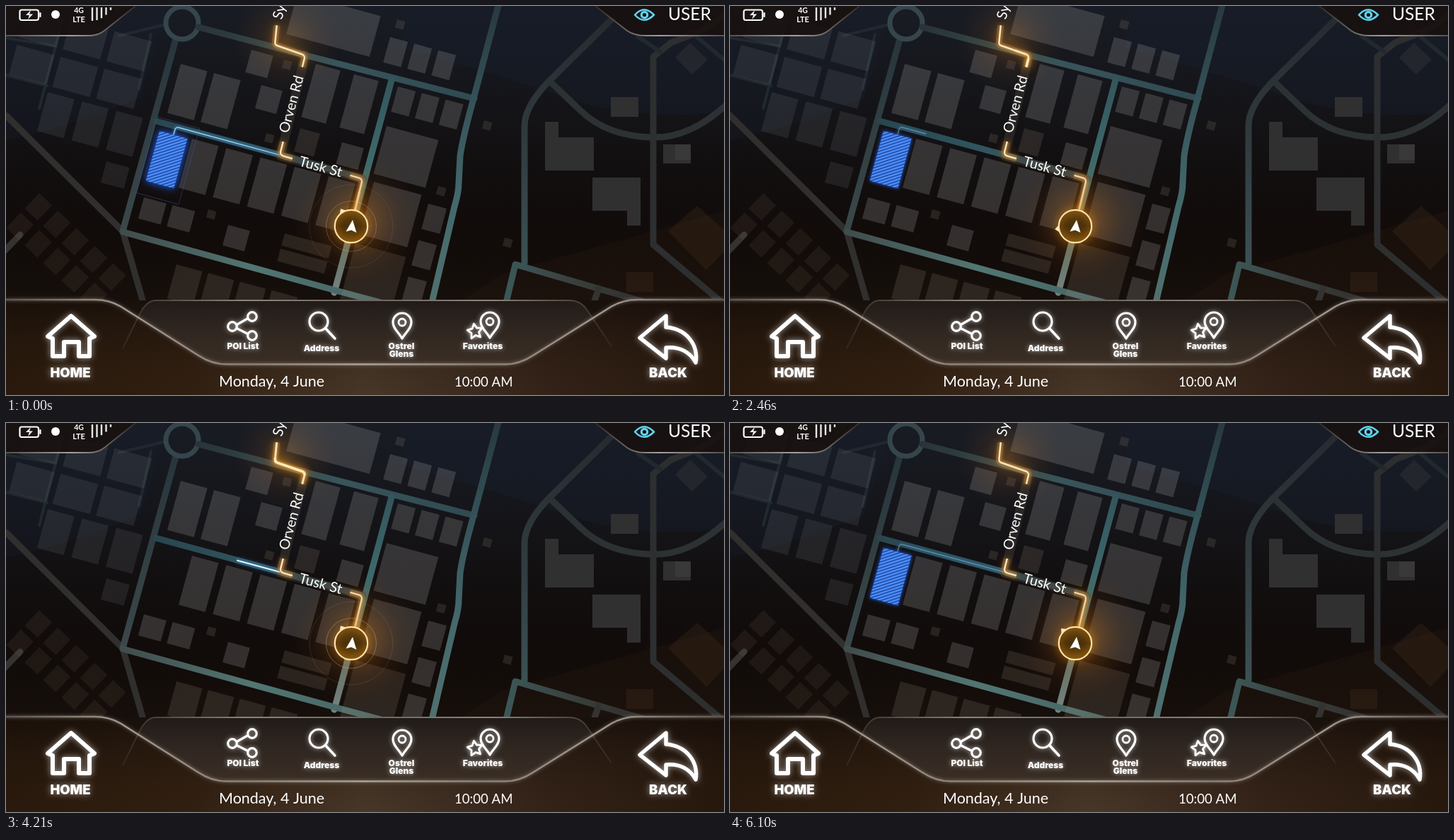
Recreate the animation shown at these times as an HTML page with a canvas. Size 1015 by 551 pixels, loop 6160 ms.

```html
<!DOCTYPE html>
<html lang="en">
<head>
<meta charset="utf-8">
<title>Navigation</title>
<style>
html, body { margin: 0; width: 100%; height: 100%; overflow: hidden; background: #110d0c; }
canvas { display: block; width: 100vw; height: 100vh; }
</style>
</head>
<body>
<canvas id="stage" width="1015" height="551"></canvas>
<script>
const W = 1015, H = 551, LOOP = 6160, CYCLE = 4800, TILT = 15.3 * Math.PI / 180;
const stage = document.getElementById('stage').getContext('2d');
let c = stage;

function layer(paint) {
  const cv = document.createElement('canvas');
  cv.width = W;
  cv.height = H;
  c = cv.getContext('2d');
  paint();
  c = stage;
  return cv;
}

function ramp(g, colors) {
  colors.forEach((col, i) => g.addColorStop(i / (colors.length - 1), col));
  return g;
}

const gradient = (x0, y0, x1, y1, ...colors) => ramp(c.createLinearGradient(x0, y0, x1, y1), colors);

function glowSpot(x, y, r, ...colors) {
  c.fillStyle = ramp(c.createRadialGradient(x, y, 0, x, y, r), colors);
  c.fillRect(x - r, y - r, 2 * r, 2 * r);
}

function line(d, color, width) {
  c.strokeStyle = color;
  c.lineWidth = width;
  c.stroke(new Path2D(d));
}

function fill(d, color) {
  c.fillStyle = color;
  c.fill(new Path2D(d));
}

function disc(x, y, r, color) {
  c.beginPath();
  c.arc(x, y, r, 0, 7);
  c.fillStyle = color;
  c.fill();
}

function ring(x, y, r, color, width) {
  c.beginPath();
  c.arc(x, y, r, 0, 7);
  c.strokeStyle = color;
  c.lineWidth = width;
  c.stroke();
}

function text(str, x, y, font, align = 'left', angle = 0) {
  c.save();
  c.translate(x, y);
  c.rotate(angle);
  c.font = font;
  c.textAlign = align;
  c.fillStyle = '#fff';
  c.fillText(str, 0, 0);
  c.restore();
}

// A turned grid of equal blocks, nx by ny, that starts at a corner.
function blocks(x, y, w, h, nx = 1, stepX = 0, ny = 1, stepY = 0, angle = TILT) {
  c.save();
  c.translate(x, y);
  c.rotate(angle);
  for (let i = 0; i < nx; i++)
    for (let j = 0; j < ny; j++) c.fillRect(i * stepX, j * stepY, w, h);
  c.restore();
}

function paintGround() {
  c.fillStyle = gradient(0, 0, 0, H, '#181c24', '#15161b', '#120f10', '#110b09', '#17100c', '#21160e');
  c.fillRect(0, 0, W, H);
  fill('M560 0 H1015 V150 Q900 165 790 130 Q690 95 560 60 Z', 'rgba(24,30,42,.45)');
  fill('M0 0 H230 L190 130 Q80 175 0 190 Z', 'rgba(24,32,46,.3)');
  fill('M700 380 L1015 290 V420 H640 Z', 'rgba(50,30,16,.2)');
}

function paintRoads() {
  c.lineCap = 'round';
  c.lineJoin = 'round';
  const dim = '#20292e', gray = '#2d2e2f';
  line('M0 45 L70 57 M75 38 L47 145 M0 98 L58 113 M205 40 L188 118 M160 42 L226 26', dim, 4);
  line('M0 155 L165 319 L194 420', '#302f2d', 9);
  line('M240 47 L165 319', gradient(0, 47, 0, 319, '#28363c', '#3b484a'), 9);
  ring(249, 24, 23, '#35454b', 7);
  line('M272 30 L424 70 L662 131', gradient(272, 30, 662, 131, '#293438', '#38555a', '#304a51'), 9);
  line('M697 -5 L661 131 Q646 185 642 212 L640 250 Q640 264 634 284 L602 420',
    gradient(0, 0, 0, 417, '#293940', '#355359', '#44696c', '#50706e'), 9);
  line('M545 105 L464 406', gradient(0, 105, 0, 406, '#33565d', '#41706f', '#77807a'), 9);
  line('M212 163 L388 211 L502 244', gradient(212, 0, 502, 0, '#29464e', '#31555f', '#414b4b'), 9);
  line('M165 320 L470 404 L530 420', gradient(165, 0, 530, 0, '#414c4c', '#527672', '#466463'), 9);
  line('M857 18 L768 106 Q733 142 733 170 V364', gradient(0, 18, 0, 364, '#262b30', '#303b3e', '#3b5153'), 9);
  line('M768 106 L812 148 Q850 185 915 186 Q967 187 1018 140', '#2c3234', 9);
  line('M1018 12 Q986 35 975 38 L940 52 L915 72 V338 L1018 425', gray, 9);
  line('M893 43 L925 65 M972 40 L1015 76', dim, 6);
  line('M707 420 L720 366 L905 420', gradient(707, 0, 905, 0, '#3c5757', '#393f3d', '#302e2b'), 9);
  line('M838 400 L831 420 M-5 350 L20 324', '#353331', 9);
  line('M388 212 L423 70 M388 212 L504 245', 'rgba(70,64,58,.42)', 13);
}

function paintBlocks() {
  c.fillStyle = 'rgba(150,154,160,.13)';
  blocks(30, 2, 55, 44, 3, 64, 2, 55);
  blocks(59, 122, 39, 57, 3, 50.3);
  blocks(142, 220, 34, 31);

  c.fillStyle = 'rgba(168,168,170,.23)';
  blocks(247, 82, 39, 72, 2, 48.8);
  blocks(347, 62, 32, 33);
  blocks(361, 112, 31, 34);
  blocks(195, 271, 33, 31, 2, 42);
  blocks(314, 310, 32, 30);
  blocks(438, 82, 36, 78, 2, 56);
  blocks(475, 193, 32, 32);
  blocks(412, -18, 122, 60);
  blocks(543, 44, 26, 37, 3, 35.3);
  blocks(554, 114, 26, 37, 3, 35);
  blocks(538, 170, 76, 70);
  blocks(520, 249, 70, 77);
  blocks(263, 188, 39, 72, 5, 50.1);
  blocks(597, 280, 27, 37, 1, 0, 3, 53.5);

  c.fillStyle = 'rgba(165,148,130,.17)';
  blocks(416, 173, 29, 34);
  blocks(394, 322, 69, 18, 1, 0, 2, 22.6);
  blocks(494, 336, 74, 84);
  blocks(241, 366, 38, 50, 4, 46.5);
  for (const [x, y] of [[553, 19], [393, 76], [676, 162], [368, 180], [611, 255], [286, 288], [705, 328]])
    blocks(x, y, 12, 12);

  c.fillStyle = 'rgba(120,98,80,.14)';
  blocks(47, 265, 25, 30, 5, 36, 2, 38, 0.76);

  fill('M855 129 h39 v28 h-39 Z M762 164 h19 v22 h50 v47 h-69 Z M829 243 h68 v68 h-19 v-21 h-49 Z M929 196 h39 v27 h-39 Z', '#303031');
  fill('M946 196 h22 v22 h-22 Z', '#393939');
  fill('M967 52 L992 76 L970 97 L946 73 Z', '#23262c');
  fill('M977 283 L1018 320 V345 L990 374 L936 319 Z M877 377 h38 v28 h-38 Z', 'rgba(90,60,38,.2)');
}

const railPath = 'M0 416 H125 Q146 416 162 425.500 L272 495 Q291 507.500 312 507.500 H706 Q726 507.500 745 495 L856 425.500 Q873 416 893 416 H1015';
const topLeft = 'M0 42 H118 Q130 42 139 35 L183 0';
const topRight = 'M1015 42 H904 Q888 42 878 35 L833 0';

function paintPanels() {
  fill(topLeft + ' H0 Z', 'rgba(24,18,15,.88)');
  fill(topRight + ' H1015 Z', 'rgba(24,18,15,.88)');
  line(topLeft, gradient(0, 0, 185, 0, '#55504c', '#a5a09a', '#2e2b2a'), 2);
  line(topRight, gradient(1015, 0, 833, 0, '#55504c', '#a5a09a', '#2e2b2a'), 2);

  c.fillStyle = gradient(0, 416, 0, H, '#17100b', '#2a1b0f');
  c.fillRect(0, 417, W, H - 417);
  fill(railPath + ' V551 H0 Z', gradient(0, 0, W, 0, '#28190d', '#301f11', '#4a3a2c', '#33231a', '#25170d'));
  fill(railPath + ' V551 H0 Z', gradient(0, 416, 0, H, 'rgba(14,9,7,.6)', 'rgba(50,30,12,.1)'));
  fill('M211 417 H796 Q813 417 821 430 L831 441 L745 495 Q726 507 706 507 H312 Q291 507 272 495 L187 441 Q197 417 211 417 Z',
    gradient(0, 417, 0, 507, '#211b18', '#302721', '#3a2e24'));
  line('M165 485 L188 438 Q198 417 212 417 H796 Q812 417 821 430 L856 482',
    gradient(165, 0, 856, 0, '#33281f', '#8d857d', '#6b645e', '#8d857d', '#33281f'), 1.8);
  c.shadowColor = 'rgba(255,235,215,.4)';
  c.shadowBlur = 5;
  line(railPath, gradient(0, 0, W, 0, '#5c554f', '#a39b93', '#877f78', '#aaa29b', '#877f78', '#a39b93', '#5c554f'), 2.4);
  c.shadowBlur = 0;
}

function pin(x, y) {
  line(`M${x} ${y + 23} C${x - 5} ${y + 14} ${x - 13} ${y + 9} ${x - 13} ${y} A13 13 0 0 1 ${x + 13} ${y} C${x + 13} ${y + 9} ${x + 5} ${y + 14} ${x} ${y + 23} Z`, '#fff', 3.2);
  ring(x, y, 5, '#fff', 2.8);
}

function star(x, y, r) {
  c.beginPath();
  for (let i = 0; i < 10; i++) {
    const a = i * Math.PI / 5 - Math.PI / 2 - 0.15, d = i % 2 ? r * 0.5 : r;
    c.lineTo(x + d * Math.cos(a), y + d * Math.sin(a));
  }
  c.closePath();
  c.fillStyle = '#2c241f';
  c.fill();
  c.stroke();
}

function paintButtons() {
  c.lineCap = c.lineJoin = 'round';
  c.shadowColor = 'rgba(255,255,255,.6)';
  c.shadowBlur = 9;
  line('M59 468 L92 439 L125 468 L118 471 V496 H103 V476 H82 V496 H66 V471 Z', '#fff', 6);
  line('M933 439 L896 470 L933 499 V484 C952 482 967 490 975 505 C979 480 962 457 933 455 Z', '#fff', 5.5);
  const big = '900 18.5px Inter, sans-serif', small = '900 12px Inter, sans-serif';
  text('HOME', 91, 526, big, 'center');
  text('BACK', 936, 526, big, 'center');

  c.shadowBlur = 6;
  line('M341 443 L327 451 M327 457 L341 464', '#fff', 3.2);
  for (const [x, y] of [[348, 440], [320, 454], [348, 467]]) ring(x, y, 6.3, '#fff', 3.2);
  ring(442, 447, 13, '#fff', 3.2);
  line('M452 457 L465 471', '#fff', 3.6);
  pin(560, 448);
  pin(684, 447);
  star(663, 461, 11);
  text('POI List', 335, 486, small, 'center');
  text('Address', 446, 489, small, 'center');
  text('Ostrel', 559, 486, small, 'center');
  text('Glens', 559, 497, small, 'center');
  text('Favorites', 674, 486, small, 'center');
  c.shadowBlur = 0;
}

function paintStatus() {
  text('Monday, 4 June', 301, 539, '21.5px Lato, sans-serif');
  text('10:00 AM', 634, 539, '18.6px Lato, sans-serif');
  text('USER', 936, 20, '24.5px Lato, sans-serif');
  line('M22 5.500 H43 Q46 5.500 46 8.500 V17 Q46 20 43 20 H22 Q19.500 20 19.500 17 V8.500 Q19.500 5.500 22 5.500 Z M48.500 10 V15', '#fff', 2.2);
  fill('M35 6 L28 13 H33 L31 19 L38 11.500 H33 Z', '#fff');
  disc(70, 12, 6, '#fff');
  text('4G', 103, 10, 'bold 10.5px Lato, sans-serif', 'center');
  text('LTE', 103, 23, 'bold 11px Lato, sans-serif', 'center');
  c.lineCap = 'butt';
  for (let i = 0; i < 5; i++) line(`M${122 + i * 6.5} 2 V${21 - i * i * 0.95}`, '#e8e8e8', 2.4);
  line('M889 12.500 Q902 -2 916 12.500 Q902 27 889 12.500 Z', '#5fd3ee', 2.6);
  ring(902.5, 12.5, 4.2, '#5fd3ee', 3.2);
}

const ground = layer(() => { paintGround(); paintRoads(); paintBlocks(); });
const overlay = layer(() => { paintPanels(); paintButtons(); paintStatus(); });

const span = (t, a, b) => Math.max(0, Math.min(1, (t - a) / (b - a)));
const smooth = v => v * v * (3 - 2 * v);
const easeOut = v => 1 - (1 - v) ** 3;
const mix = (a, b, v) => a + (b - a) * v;
// Time since a late event, carried over the start of the cycle.
const since = (p, event) => p > 3400 ? p - event : p + CYCLE - event;

function rounded(points, r) {
  const p = new Path2D();
  p.moveTo(...points[0]);
  for (let i = 1; i < points.length - 1; i++) p.arcTo(...points[i], ...points[i + 1], r);
  p.lineTo(...points[points.length - 1]);
  return p;
}

function strokePart(path, from, to, color, width, glow, blur) {
  if (to <= from) return;
  c.save();
  c.setLineDash([0, from, to - from, 2000]);
  c.strokeStyle = color;
  c.lineWidth = width;
  c.shadowColor = glow;
  c.shadowBlur = blur;
  c.stroke(path);
  c.restore();
}

const HUB = [488, 312];
const route = rounded([HUB, [504, 245], [387, 211], [423, 70], [380, 55], [386, -5]], 5);
const routeParts = [[24, 85], [170, 206], [315, 402]];
const branch = rounded([[387, 211], [240, 171], [237, 182]], 4);
const BRANCH = 162;

function drawRoute(p) {
  const head = (p % 1600) * 0.35;
  glowSpot(396, 48, 75, 'rgba(235,150,50,.26)', 'rgba(190,110,35,.1)', 'rgba(150,80,20,0)');
  for (const [a, b] of routeParts) {
    strokePart(route, a, b, 'rgba(205,150,80,.28)', 9, 'rgba(255,150,30,.55)', 16);
    strokePart(route, a, b, '#fbe4bb', 2.5, '#f09a28', 7);
    for (let reach = 50; reach > 20; reach -= 24) {
      const from = Math.max(a, head - reach), to = Math.min(b, head + reach);
      strokePart(route, from, to, `rgba(255,238,195,${20 / reach})`, 3.6, '#ffa51f', 13);
    }
  }
}

function drawBranch(p) {
  const growing = p > 3000, age = span(p, 0, 1000);
  const cut = growing ? 0 : BRANCH * smooth(span(p, 1900, 2780));
  const end = growing ? BRANCH * span(p, 4040, 4480) : BRANCH;
  const settle = span(p, 4250, 4720);
  const width = growing ? mix(2.2, 1.2, settle) : mix(1.2, 0.8, age);
  c.globalAlpha = growing ? 1 : mix(1, 0.65, age);
  strokePart(branch, cut, end, 'rgba(60,130,190,.12)', 7, '#2f7fc8', 5);
  strokePart(branch, cut, end, settle < 0.5 && growing ? '#e6f4ff' : '#b4dcee', width, '#3f8fd8', growing ? mix(9, 4, settle) : 3);
  c.globalAlpha = 1;
}

function hatch(base, stripe, alpha, blur) {
  if (alpha <= 0) return;
  c.save();
  c.globalAlpha = alpha;
  c.translate(217, 177);
  c.rotate(TILT);
  c.shadowColor = '#1f62ff';
  c.shadowBlur = blur;
  c.fillStyle = base;
  c.fillRect(0, 0, 41, 73);
  c.shadowBlur = 0;
  c.beginPath();
  c.rect(0, 0, 41, 73);
  c.clip();
  c.beginPath();
  for (let y = 0; y < 108; y += 4.8) {
    c.moveTo(-1, y);
    c.lineTo(43, y - 29);
  }
  c.strokeStyle = stripe;
  c.lineWidth = 2.5;
  c.stroke();
  c.restore();
}

function drawTarget(p) {
  const shown = p > 3500 ? span(p, 4350, 4600) : 1 - span(p, 2620, 2980);
  const ghost = span(p, 2600, 2800) * (1 - span(p, 3060, 3400));
  hatch('rgba(30,28,27,.6)', '#4a4847', ghost, 0);
  hatch('#1f49a2', '#4c8df8', shown, p > 3500 ? 12 : mix(12, 5, span(p, 0, 900)));

  const age = since(p, 4450);
  if (age < 0 || age > 1000) return;
  const s = 1 + 0.58 * easeOut(span(age, 0, 700));
  c.save();
  c.translate(229, 219);
  c.rotate(TILT);
  c.strokeStyle = `rgba(72,100,165,${0.4 * (1 - span(age, 250, 1000))})`;
  c.lineWidth = 1;
  c.strokeRect(-20.5 * s, -37 * s, 41 * s, 74 * s);
  c.restore();
}

function drawHub(p) {
  const [x, y] = HUB;
  glowSpot(x + 8, y - 8, 92, 'rgba(255,150,20,.45)', 'rgba(205,115,22,.26)', 'rgba(150,85,25,.1)', 'rgba(120,60,10,0)');
  const age = since(p, 3550);
  if (age > 0 && age < 1850) {
    const fade = 1 - span(age, 1100, 1850), grow = easeOut(span(age, 0, 800));
    ring(x, y, 23 + 12.5 * grow, `rgba(225,200,165,${0.36 * fade})`, 1);
    ring(x, y, 23 + 36 * grow, `rgba(205,175,140,${0.15 * fade})`, 1);
  }
  const turn = -31 - 68 * Math.sin(Math.PI * p / CYCLE) ** 6;
  c.save();
  c.translate(x, y);
  c.rotate(turn * Math.PI / 180);
  fill('M-6 -22 L0 -29 L6 -22 Z', '#fff3dc');
  c.restore();
  disc(x, y, 23, gradient(x, y - 23, x, y + 23, '#65430f', '#4a2f0a', '#744a0d'));
  c.save();
  c.shadowColor = '#ff9d14';
  c.shadowBlur = 11;
  ring(x, y, 23.2, '#ffe2ac', 2.2);
  c.restore();
  fill('M490 303 L495.500 321 L488 317.500 L480.500 319.500 Z', '#fff');
}

function drawLabels() {
  const font = '20px Lato, sans-serif', up = TILT - Math.PI / 2;
  text('Orven Rd', 399, 181, font, 'left', up);
  text('Tusk St', 413, 226, font, 'left', TILT);
  text('Sy', 390, 20, font, 'left', up);
}

function draw(now) {
  const p = (now % LOOP) % CYCLE;
  c.lineCap = 'butt';
  c.lineJoin = 'round';
  c.drawImage(ground, 0, 0);
  drawTarget(p);
  drawBranch(p);
  drawRoute(p);
  drawHub(p);
  drawLabels();
  c.drawImage(overlay, 0, 0);
}

const start = performance.now();
function tick() {
  draw(performance.now() - start);
  requestAnimationFrame(tick);
}
tick();
</script>
</body>
</html>
```
